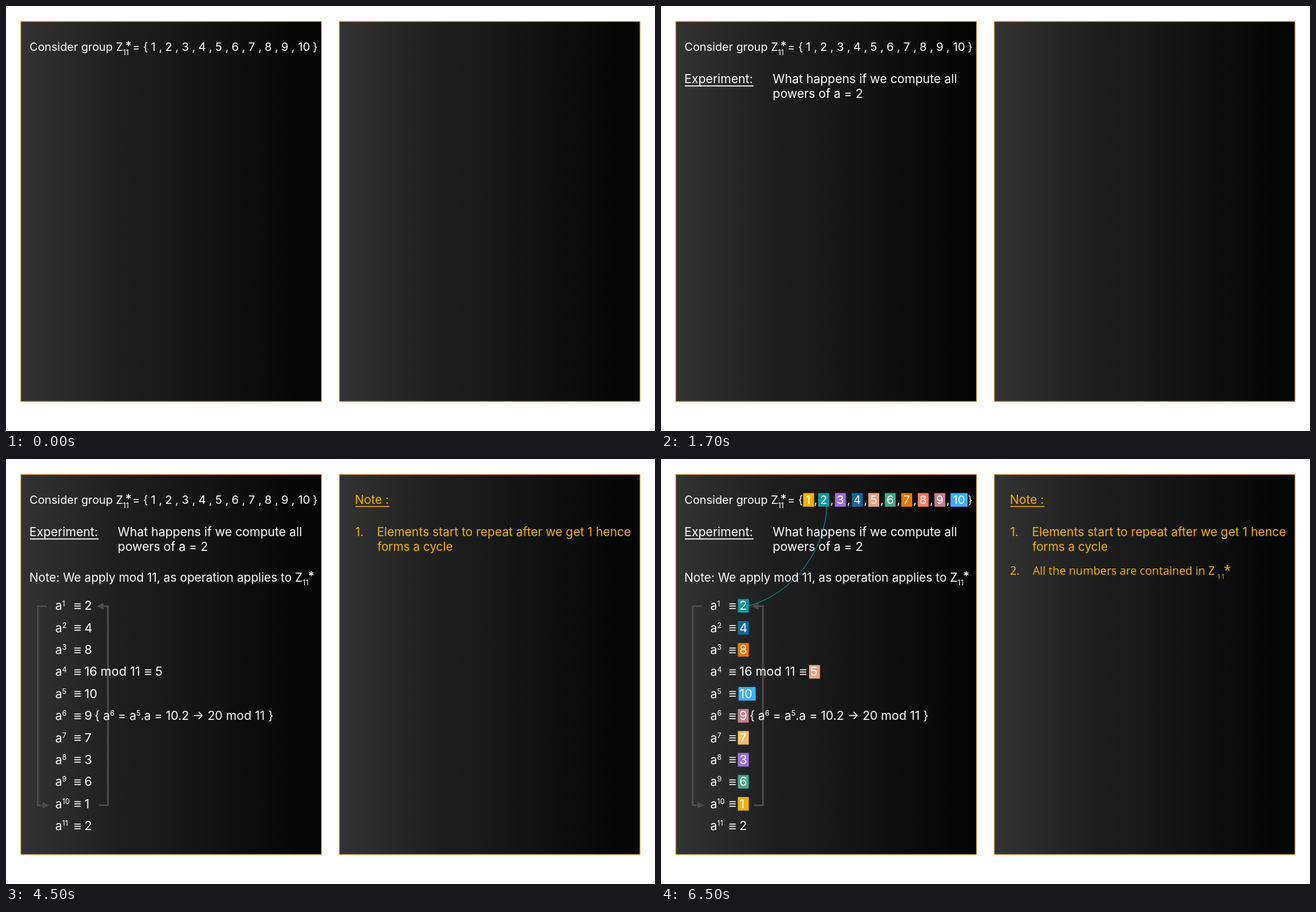
An HTML page that plays this animation: 925 px wide and 606 px high, repeating every 8000 ms.

```html
<!DOCTYPE html>
<html lang="en">
<head>
<meta charset="utf-8">
<title>Powers in a cyclic group</title>
<style>
  html, body { margin: 0; width: 100%; height: 100%; overflow: hidden; background: #fff; }
  svg { display: block; width: 925px; height: 606px; }
  text { font-family: Inter, sans-serif; white-space: pre; }
  .alt { font-family: "Open Sans", "Noto Sans", sans-serif; font-weight: 500; }
</style>
</head>
<body>
<svg id="stage" viewBox="0 0 925 606" xmlns="http://www.w3.org/2000/svg">
  <defs>
    <linearGradient id="shade">
      <stop offset="0" stop-color="#333"/>
      <stop offset=".33" stop-color="#1e1e1e"/>
      <stop offset=".5" stop-color="#181818"/>
      <stop offset=".92" stop-color="#060606"/>
      <stop offset="1" stop-color="#050505"/>
    </linearGradient>
  </defs>
</svg>
<script>
const LOOP = 8000;
const WHITE = '#fff', GOLD = '#f0b400', GREY = '#4b4b4b';
const COLORS = ['#ecb400', '#1599a3', '#a06ee0', '#0d6a9e', '#e8a284',
                '#48a68a', '#e87800', '#ff7d5c', '#c67f8f', '#3db1ff'];
const CENTERS = [209.8, 231.9, 255.7, 279.7, 303.2, 326.7, 350.2, 373.7, 397.4, 424.9];
const POWERS = [2, 4, 8, 5, 10, 9, 7, 3, 6, 1, 2];
const ROW_COLORS = { 7: '#f8bf5c', 8: '#e87800' };
const SIZE = 17.35, VALUE_SIZE = 17.7, ROW_STEP = 31.36;

const stage = document.getElementById('stage');
const steps = [];

function add(parent, tag, attrs) {
  const el = document.createElementNS('http://www.w3.org/2000/svg', tag);
  for (const key in attrs) el.setAttribute(key, attrs[key]);
  return parent.appendChild(el);
}

function step(start) {
  const el = add(stage, 'g', {});
  steps.push({ el, start });
  return el;
}

// "^6 " style marks raise the digits that follow the caret
function write(parent, x, y, size, str, attrs) {
  const el = add(parent, 'text', { x, y, 'font-size': size, fill: WHITE, ...attrs });
  let raised = false;
  for (const part of String(str).split(/(\^\d+)/)) {
    const up = part[0] === '^';
    if (!part) continue;
    const span = add(el, 'tspan', { dy: up ? -5.9 : raised ? 5.9 : 0 });
    if (up) span.setAttribute('font-size', size * .6);
    span.textContent = up ? part.slice(1) : part;
    raised = up;
  }
}

const mid = { 'text-anchor': 'middle' };
const rowY = i => 215.4 + ROW_STEP * i;

function line(parent, d, stroke, width) {
  add(parent, 'path', { d, stroke, 'stroke-width': width, fill: 'none' });
}

function box(parent, cx, cy, value, fill) {
  const w = value === 10 ? 24.4 : 15.6;
  add(parent, 'rect', { x: cx - w / 2, y: cy - 9.7, width: w, height: 19.4, fill });
}

// Subscript 11 and star after a Z
function marks(parent, x, y, starX) {
  write(parent, x, y + 5.8, 10.8, '11');
  write(parent, starX, y - 1.3, 17.5, '*', { ...mid, 'font-weight': 500 });
}

function congruent(parent, x, y) {
  write(parent, x, y + .5, 18.8, '≡', { ...mid, 'font-weight': 500 });
}

for (const x of [21, 475]) {
  add(stage, 'rect', { x, y: 22, width: 428.8, height: 542,
    fill: 'url(#shade)', stroke: '#e8a33d', 'stroke-width': 1 });
}

// Layers from back to front; the marker layers sit under the text
const cycle = step(4500), match = step(6500);
const intro = step(0), question = step(500), powers = step(2500);
const remark = step(4500), remark2 = step(6500);

write(intro, 33.6, 63.8, 16.2, 'Consider group Z');
marks(intro, 166.4, 63.8, 174.6);
write(intro, 180.2, 63.8, 16.2, '= {');
CENTERS.forEach((cx, i) => {
  write(intro, cx, 63.8, 16.5, i + 1, mid);
  if (i < 9) write(intro, cx + (i ? 11.8 : 10.6), 63.8, 16.2, ',', mid);
  box(match, i ? cx : 210.4, 58.3, i + 1, COLORS[i]);
});
write(intro, 440.7, 63.8, 16.2, '}', mid);

write(question, 33.3, 109.6, SIZE, 'Experiment:');
line(question, 'M34 114H132', WHITE, 1.3);
write(question, 159.3, 109.6, SIZE, 'What happens if we compute all');
write(question, 159.3, 130.8, SIZE, 'powers of a = 2');

write(powers, 33.2, 174.5, 17.02, 'Note: We apply mod 11, as operation applies to Z');
marks(powers, 422.5, 174.5, 435.1);
POWERS.forEach((n, i) => {
  const y = rowY(i), long = i === 3;
  write(powers, 70.2, y, SIZE, 'a^' + (i + 1));
  congruent(powers, 102.1, y);
  if (long) {
    write(powers, 111.7, y, VALUE_SIZE, '16 mod 11');
    congruent(powers, 202.6, y);
  }
  write(powers, long ? 212.7 : 111.7, y, VALUE_SIZE, n);
  if (i < 10) {
    const cx = long ? 218.8 : n === 10 ? 122.7 : 117.3;
    box(match, cx, y - 6, n, ROW_COLORS[n] || COLORS[n - 1]);
  }
});
write(powers, 126.2, rowY(5), SIZE, '{ a^6 = a^5.a = 10.2 → 20 mod 11 }');

line(cycle, 'M58 210H45.3V493.7H54', GREY, 2.6);
line(cycle, 'M132.5 493.7H145.3V210H137', GREY, 2.6);
add(cycle, 'path', { d: 'M52 488.8L61.5 493.7L52 498.6ZM139 205.1L129.5 210L139 214.9Z', fill: GREY });
line(match, 'M236.5 68C232 140 180 195 125 209', '#1b9797', 1);

const gold = { fill: GOLD };
write(remark, 497.3, 63.8, 17.2, 'Note :', gold);
line(remark, 'M498 67.6H546.5', GOLD, 1.3);
write(remark, 497.8, 110.3, 17.2, '1.', gold);
write(remark, 528.7, 110.3, 17.2, 'Elements start to repeat after we get 1 hence', gold);
write(remark, 529.2, 130.8, 16.95, 'forms a cycle', gold);

const alt = { fill: GOLD, class: 'alt' };
write(remark2, 497.6, 165, 16.2, '2.', alt);
write(remark2, 529.7, 165, 16.2, 'All the numbers are contained in Z', alt);
write(remark2, 792.6, 171, 9.8, '11', alt);
write(remark2, 807.3, 165, 19, '*', { ...alt, ...mid });

function draw(t) {
  for (const { el, start } of steps) {
    el.setAttribute('visibility', t >= start ? 'visible' : 'hidden');
  }
}

const origin = performance.now();
function tick(now) {
  draw(Math.max(0, now - origin) % LOOP);
  requestAnimationFrame(tick);
}
draw(0);
requestAnimationFrame(tick);
</script>
</body>
</html>
```
